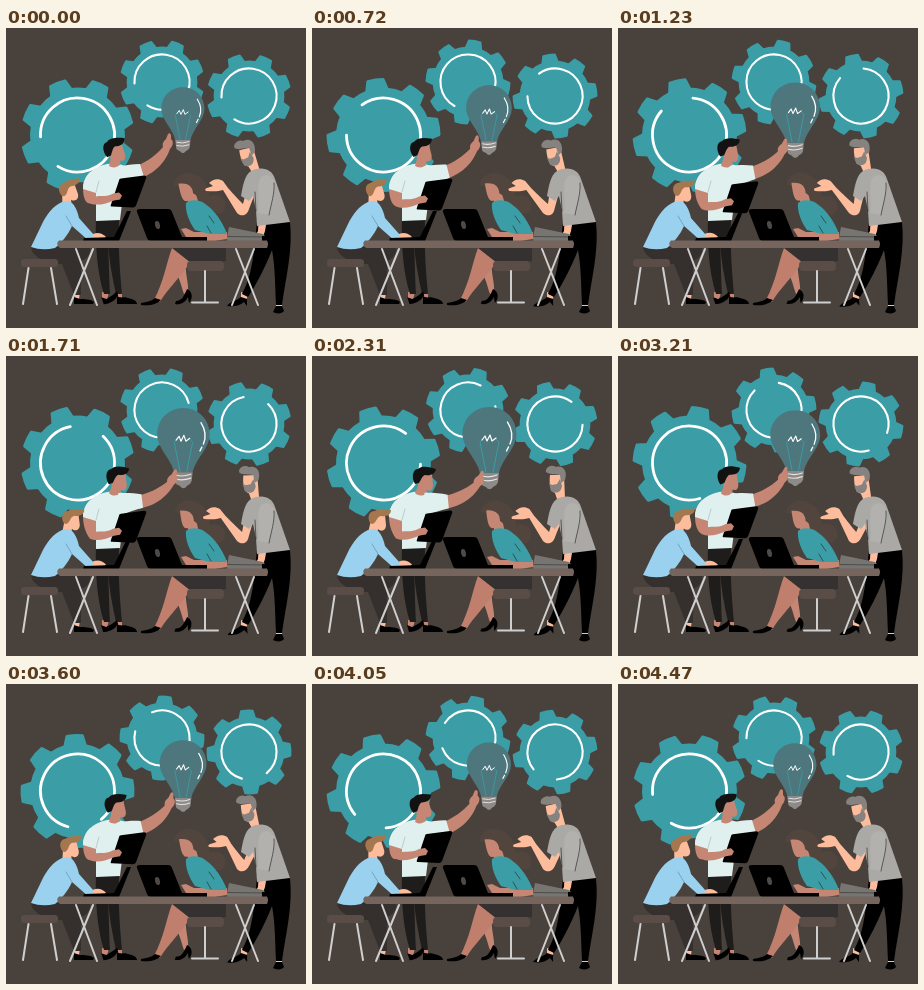
Animation of 300 by 300 pixels, one loop 4.53 s. Source, as an HTML page:

```html
<!DOCTYPE html>
<html lang="en">
<head>
<meta charset="utf-8">
<title>Team with an idea</title>
<style>
html, body { margin: 0; width: 100%; height: 100%; overflow: hidden; background: #49413c; }
svg { display: block; width: 100vw; height: 100vh; }
.line { fill: none; stroke-linecap: round; stroke-linejoin: round; }
.steel { stroke: #cfcfcf; stroke-width: 2; }
.ink { stroke: #33302e; stroke-width: .7; }
.tan { fill: #c58673; }
.fair { fill: #fdbc9c; }
</style>
</head>
<body>
<svg viewBox="0 0 300 300">
  <rect width="300" height="300" fill="#49413c"/>
  <g id="gears"></g>

  <g id="bulb">
    <path fill="#4d767d" d="M177.500 51C193 51 204.500 63 204.500 78C204.500 92 190 103 187 117H168C165 103 150.500 92 150.500 78C150.500 63 162 51 177.500 51Z"/>
    <g class="line">
      <path stroke="#3b9da6" stroke-width="1" d="M174 116L168 86L171 83M181 116L187 86L184 83"/>
      <path stroke="#fff" stroke-width="1.200" d="M170 84L173 80L175 85L178 79L180 85L184 82"/>
      <path stroke="#fff" stroke-width="1.400" d="M195.500 66C200 73 201 81 198 88M196.500 91L194.500 95"/>
    </g>
    <path fill="#8d8a88" d="M168 117H187L186 126C185 129 183 130 181 131C179 134 176 134 174 131C171 130 169 129 169 126Z"/>
    <path class="line" stroke="#e4e4e4" stroke-width="1.200" d="M170 120Q177 122 185 119M170 124Q177 126 185 123"/>
  </g>

  <!-- standing man -->
  <path class="tan" d="M96 264H103L101 272L96 271ZM110 264H116V271H111Z"/>
  <path fill="#1e1d1c" d="M90 190H113C112 220 114 245 116 266H110C106 248 103 232 102 214C103 236 103 250 104 266H98C91 244 89 215 90 190Z"/>
  <path id="toeA" d="M95 269L100 271C104 269 108 267 111 264L112 268C109 273 103 276 97 276Z"/>
  <path d="M111 268C116 271 118 268 122 270C127 271 131 273 131 276H111Z"/>
  <path fill="#dff0ef" d="M101 136C108 135 116 136 122 139L118 160L114 192L90 193L90 165L77 161C77 149 86 139 101 136Z"/>
  <g id="headB">
    <path class="tan" d="M106 118H120L121 129C121 134 118 136 115 134L114 138C109 141 105 139 103 137L106 130Z"/>
    <path fill="#121212" d="M103 128C99 121 101 113 106 113C110 109 118 111 124 113C123 118 119 120 113 119C110 120 109 124 107 127Z"/>
  </g>
  <g id="armUp">
    <path class="tan" d="M131 138C142 133 150 127 157 119C156 115 158 113 160 111L162 106Q164 104 165 107L165 111C168 113 167 118 164 121C160 132 152 144 133 151Z"/>
    <path fill="#dff0ef" d="M111 139C120 137 127 136 134 136L138 149C131 152 124 157 115 161Z"/>
  </g>
  <g id="tablet">
    <path d="M113 156Q113 154 115 154L138 151Q141 151 140 154L130 181Q129 183 127 183L106 182Q104 182 105 180Z"/>
  </g>
  <path id="armDown" class="tan"/>
  <path fill="#dff0ef" d="M84 144C79 149 77 155 77 161L90 165L97 146Z"/>
  <path class="line" stroke="#9fb5b5" stroke-width=".6" d="M90 164L93 153"/>

  <!-- seated man -->
  <path class="fair" d="M68 264H74L73 271H69Z"/>
  <path fill="#35302d" d="M25 219H84C85 226 81 231 75 233L75 267H68L56 236C42 236 26 230 25 219Z"/>
  <path d="M68 269L74 271C78 271 85 271 88 274L87 276H68Z"/>
  <rect x="15" y="231" width="37" height="8" rx="3.500" fill="#5a4d47"/>
  <path class="line steel" d="M22.500 240L17 276M45 240L51 276"/>
  <g id="headA">
    <path class="fair" d="M60 160L73 159L74 169C74 175 69 176 66 173L65 179L56 177Z"/>
    <path fill="#a5774f" d="M58 167C55 161 57 155 63 155C68 152 73 155 79 154C79 159 74 161 69 160C64 161 65 167 60 168Z"/>
  </g>
  <path id="handA" class="fair" d="M82 209L87 206C92 204 96 205 100 209L98 211L84 213Z"/>
  <path fill="#99d1ee" d="M56 174C47 178 41 186 36 196L25 219Q36 223 49 220C56 214 62 207 66 198L83 213L88 207L73 190C71 180 67 175 63 173Z"/>
  <path class="line" stroke="#5f94b4" stroke-width=".7" d="M66 198L60 188"/>

  <!-- seated woman -->
  <path class="tan" d="M176 237L169 244C174 250 175 258 178 266L182 265C183 254 179 247 180 236Z"/>
  <path fill="#c07f6d" d="M166 220L184 234C176 248 162 260 154 274L148 272C158 253 160 236 166 220Z"/>
  <path d="M149 270L155 272C151 276 145 278 135 277L135 275C141 274 146 273 149 270Z"/>
  <path id="toeB" d="M181 261C185 263 187 267 185 272L183 275L182 269C179 275 174 277 169 276L170 273C176 273 178 268 181 261Z"/>
  <path fill="#343130" d="M165 219H220V233Q204 237 184 234Z"/>
  <rect x="181" y="233" width="37" height="10" rx="4" fill="#5a4d47"/>
  <path class="line steel" d="M199 243V274M186 274.500H212"/>
  <g id="headC">
    <path fill="#52453e" d="M169 156C170 146 183 141 192 147C202 151 204 162 204 169C214 166 221 174 219 181C218 187 212 190 206 184C199 183 194 178 190 174L185 160Z"/>
    <path class="tan" d="M174 152C180 150 187 152 189 158L193 177L182 176L182 172C176 174 175 163 174 152Z"/>
    <path fill="#52453e" d="M169 155C174 148 184 147 190 153L192 168L188 165C188 158 184 152 169 155Z"/>
  </g>
  <path class="tan" d="M175 201L180 200L188 204L205 204L221 204V211L202 214L180 209Z"/>
  <path fill="#3b9da6" d="M180 175C185 171 193 172 198 175C209 182 217 195 221 206L203 206L189 202C183 194 179 183 180 175Z"/>
  <path class="line ink" d="M203 188L208 195M205 205L201 198"/>

  <!-- bearded man -->
  <path class="fair" d="M235 264L242 267L240 273L235 271ZM270 274H276L276 281H270Z"/>
  <path d="M251 194H284C287 222 280 248 276 277H270C269 254 269 238 266 222C259 240 250 257 242 269L236 266C247 247 248 221 251 194Z"/>
  <path id="toeC" d="M235 269L241 271L241 278L238 274C233 278 228 279 221 278C223 274 231 273 235 269Z"/>
  <path d="M270 278H276L278 283C276 286 270 286 267 284Z"/>
  <path id="forearm" class="fair" d="M243 181C241 188 235 189 231 185L217 162C211 164 205 163 200 163Q198 161 201 160L207 158L203 155C207 151 212 150 217 153L222 160C228 167 234 173 237 176L240 165L248 168Z"/>
  <g id="headD">
    <path class="fair" d="M238 119H252L253 142L245 143L243 137C238 135 237 128 238 119Z"/>
    <path fill="#85827f" d="M237 127L240 129L245 128L248 123L250 130C249 137 244 138 239 135Z"/>
    <path fill="#85827f" d="M234 116C233 111 240 108 244 111C251 109 256 115 253 124L249 127L248 119C243 118 238 119 234 116Z"/>
  </g>
  <path class="fair" d="M253 184L262 185L259 203L256 212L247 211L252 203Z"/>
  <path fill="#aaa9a6" d="M245 143C256 138 266 141 269 151L284 194L251 198L250 182L247 168L243 173L235 168C237 158 238 148 245 143Z"/>
  <path fill="#b2b1ae" d="M254 150C261 144 267 148 269 156C269 167 265 177 263 187L252 185C254 173 250 160 254 150Z"/>
  <path class="line ink" d="M263 187C265 176 269 165 268 155M250 183L249 164"/>

  <!-- table -->
  <path d="M121 183H125L113 213H77L78 210L108 209Z"/>
  <path d="M131 184Q130 181 134 181H162Q165 181 166 184L176 209H201V213H145Q142 213 141 210Z"/>
  <ellipse cx="151.500" cy="197" rx="2.400" ry="4" transform="rotate(-14 151.500 197)" fill="#4d4a49"/>
  <path fill="#777572" d="M223 199L257 206L259 208V213H221V209Z"/>
  <path class="line" stroke="#45413f" stroke-width=".8" d="M222 208.500L258 209"/>
  <path d="M256 208H262V214H256Z"/>
  <path class="line steel" d="M70 221L91 277M87 221L64 277M230 221L252 277M248 221L226 277"/>
  <path fill="#75655d" d="M53 212.500H261Q263 216 261 220H54Q49 216 53 212.500Z"/>
</svg>
<script>
const STEP = 30, LOOP = 4530, TURN = 4500;
const $ = id => document.getElementById(id);

const polar = (r, deg) => {
  const a = deg * Math.PI / 180;
  return (r * Math.cos(a)).toFixed(2) + ' ' + (r * Math.sin(a)).toFixed(2);
};

// Eight-toothed wheel centred on the origin, with its open ring.
function wheel() {
  let d = '';
  for (let i = 0; i < 8; i++) {
    const a = i * 45;
    d += `${i ? 'L' : 'M'}${polar(46, a - 13)}L${polar(55.5, a - 8)}` +
      `A55.5 55.5 0 0 1 ${polar(55.5, a + 8)}L${polar(46, a + 13)}` +
      `A46 46 0 0 1 ${polar(46, a + 32)}`;
  }
  const ring = `M${polar(37, -70)}A37 37 0 1 1 ${polar(37, 235)}`;
  return `<path d="${d}Z" fill="#3b9da6" stroke="#3b9da6" stroke-width="3" stroke-linejoin="round"/>` +
    `<path d="${ring}" class="line" stroke="#fff" stroke-width="2.8"/>`;
}

const gears = [
  { x: 71.500, y: 107, size: 1, dir: 1, base: -111 },
  { x: 156, y: 54, size: .745, dir: -1, base: -113 },
  { x: 243, y: 68, size: .745, dir: 1, base: -111 }
];
for (const g of gears) {
  g.el = document.createElementNS('http://www.w3.org/2000/svg', 'g');
  g.el.innerHTML = wheel();
  // The ring's gap starts at the lower left, apart from the teeth.
  g.el.lastChild.setAttribute('transform', `rotate(${-113 - g.base})`);
  $('gears').append(g.el);
}

const move = (id, value) => $(id).setAttribute('transform', value);
const turn = (id, deg, x, y) => move(id, `rotate(${deg} ${x} ${y})`);

function draw(ms) {
  const t = Math.min(Math.floor(ms / STEP) * STEP, 4470);
  const w = t / TURN * 2 * Math.PI;
  const k = (1 - Math.cos(w)) / 2, s = Math.sin(w), rest = 1 - k;

  for (const g of gears) {
    const a = g.base + g.dir * t / TURN * 360;
    g.el.setAttribute('transform', `translate(${g.x} ${g.y}) rotate(${a}) scale(${g.size})`);
  }

  const size = .8 + .2 * k;
  move('bulb', `translate(${177 - .5 * rest} 92) scale(${size}) translate(-177 -92)`);

  turn('headA', -14 * rest, 60, 176);
  turn('headB', -12 * rest, 108, 137);
  turn('headC', -5 * rest, 191, 175);
  turn('headD', -14 * rest, 249, 140);
  turn('armUp', 12 * k, 122, 145);
  move('forearm', `translate(0 185) skewX(${8 * s}) translate(0 -185)`);
  move('handA', `translate(0 ${-.5 * k})`);
  turn('toeA', -4 * rest, 100, 265);
  turn('toeB', 3 * k, 181, 262);
  turn('toeC', -4 * k, 238, 269);

  const dy = -4 * Math.cos(w + .44), y = n => n + dy;
  move('tablet', `translate(0 ${dy})`);
  $('armDown').setAttribute('d',
    `M77 160C77 168 79 176 84 ${y(179)}C91 ${y(182)} 101 ${y(179)} 108 ${y(176)}` +
    `L114 ${y(175)}L116 ${y(171)}L113 ${y(168)}L107 ${y(169)}C101 ${y(173)} 95 ${y(171)} 90 ${y(172)}L90 164Z`);
}

const start = performance.now();
function tick() {
  draw((performance.now() - start) % LOOP);
  requestAnimationFrame(tick);
}
tick();
</script>
</body>
</html>
```
